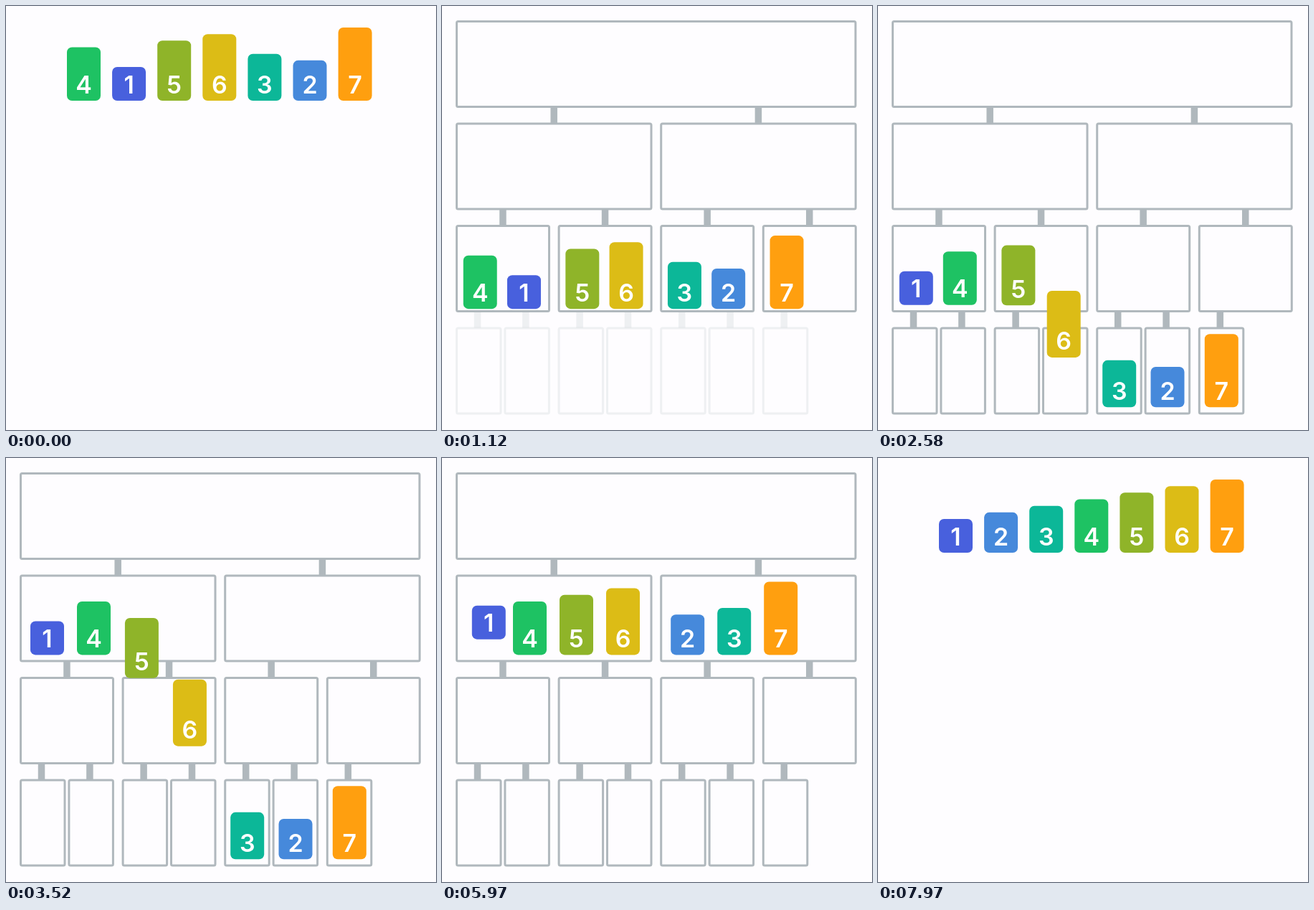
Animation of 600 by 591 pixels, one loop 8 s. Source, as an HTML page with a canvas:

```html
<!DOCTYPE html>
<html lang="en">
<head>
<meta charset="utf-8">
<title>Merge sort</title>
<style>
  html, body { margin: 0; width: 100%; height: 100%; overflow: hidden; background: #fefdff; }
  canvas { display: block; }
</style>
</head>
<body>
<canvas id="stage" width="600" height="591"></canvas>
<script>
const ctx = document.getElementById('stage').getContext('2d');
const LOOP = 8000, MOVE = 411, STAGGER = 194;
const ROW = 142.5, HALF = 285.2, QUARTER = 142.6;
const LINE = '#b0b8bd';
const COLORS = ['', '#4860dd', '#4689db', '#0cb798', '#1ec263', '#8fb429', '#dcbc16', '#ff9f0f'];
const INPUT = [4, 1, 5, 6, 3, 2, 7];
const SPLITS = [175, 622, 1070];
const ROW_IN = [20, ...SPLITS], ROW_FADE = [150, 250, 250, 250];

// Left edge of a bar in slot i of group g on each row
const slotX = [
  (g, i) => 85 + 63.1 * i,
  (g, i) => 34 + HALF * g + 65 * i,
  (g, i) => 29.8 + QUARTER * g + 61 * i,
  (g, i) => 28 + QUARTER * (g >> 1) + 67.3 * (g & 1)
];

// Each merge: start time, destination row, group, sorted values
const MERGES = [
  [1518, 2, 0, [1, 4]],
  [2185, 2, 1, [5, 6]],
  [2852, 1, 0, [1, 4, 5, 6]],
  [3897, 2, 2, [2, 3]],
  [4554, 2, 3, [7]],
  [5017, 1, 1, [2, 3, 7]],
  [5866, 0, 0, [1, 2, 3, 4, 5, 6, 7]]
];

const bars = INPUT.map((value, i) => {
  const stop = (start, row, group, slot) => ({ start, row, x: slotX[row](group, slot) });
  const legs = SPLITS.map((start, k) => {
    const row = k + 1, size = 8 >> row;
    return stop(start, row, Math.floor(i / size), i % size);
  });
  for (const [start, row, group, values] of MERGES) {
    const slot = values.indexOf(value);
    if (slot >= 0) legs.push(stop(start + slot * STAGGER, row, group, slot));
  }
  return { value, home: stop(0, 0, 0, i), legs };
});

const clamp = v => Math.min(1, Math.max(0, v));
const ease = v => (1 - Math.cos(Math.PI * clamp(v))) / 2;

function drawBox(x, y, w) {
  ctx.beginPath();
  ctx.roundRect(x, y, w, 119, 2);
  ctx.stroke();
}

function drawRow(row) {
  const y = 21.5 + ROW * row;
  const count = [1, 2, 4, 7][row], width = [556.5, 271.5, 129, 61.5][row];
  for (let i = 0; i < count; i++) {
    const x = 20.5 + (row < 3 ? i * (row < 2 ? HALF : QUARTER)
                              : QUARTER * (i >> 1) + 67.4 * (i & 1));
    drawBox(x, y, width);
    if (row) ctx.fillRect(x + width / 2 - (row === 3 ? 6.5 : 4.8), y - 22.5, 9.5, 22);
  }
}

function drawBar({ value, home, legs }, t) {
  let { x, row } = home;
  for (const leg of legs) {
    const p = ease((t - leg.start) / MOVE);
    x += (leg.x - x) * p;
    row += (leg.row - row) * p;
  }
  const bottom = 132 + 142.4 * row, height = 47 + 9.17 * (value - 1);
  ctx.fillStyle = COLORS[value];
  ctx.beginPath();
  ctx.roundRect(x, bottom - height, 47, height, 7);
  ctx.fill();
  ctx.fillStyle = '#fff';
  ctx.fillText(value, x + 23.5, bottom - 10.5);
}

function draw(now) {
  const t = now % LOOP;
  ctx.globalAlpha = 1;
  ctx.fillStyle = '#fefdff';
  ctx.fillRect(0, 0, 600, 591);

  ctx.strokeStyle = ctx.fillStyle = LINE;
  ctx.lineWidth = 3;
  const fadeOut = 1 - ease((t - 7470) / 290);
  ROW_IN.forEach((start, row) => {
    ctx.globalAlpha = fadeOut * clamp((t - start) / ROW_FADE[row]);
    if (ctx.globalAlpha) drawRow(row);
  });

  ctx.globalAlpha = 1;
  ctx.font = '600 34px Inter, sans-serif';
  ctx.textAlign = 'center';
  bars.forEach(bar => drawBar(bar, t));
}

const begin = performance.now();
function tick() {
  draw(performance.now() - begin);
  requestAnimationFrame(tick);
}
tick();
</script>
</body>
</html>
```
